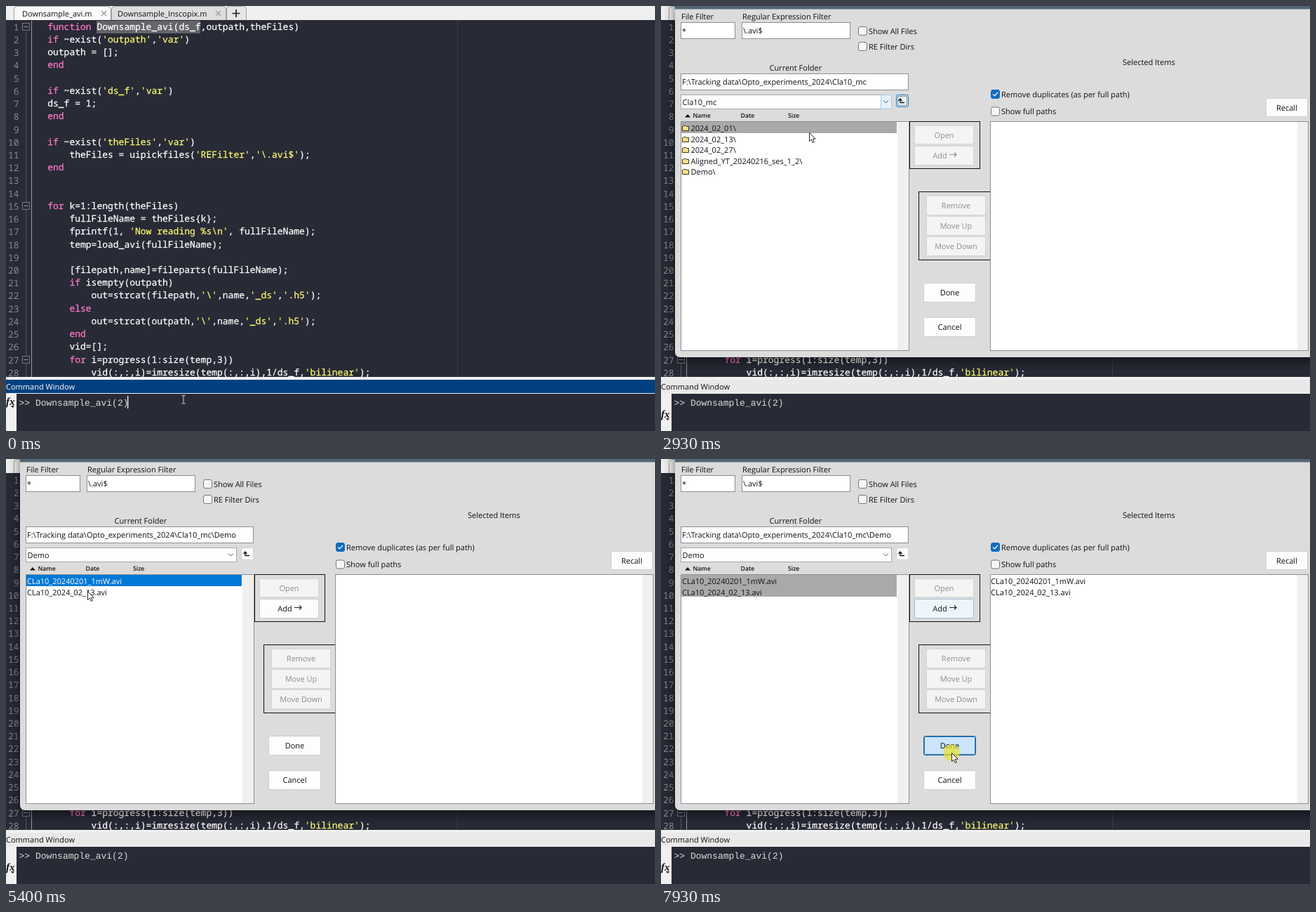
An HTML page that plays this animation: 925 by 605 pixels, repeating every 8 s.

```html
<!DOCTYPE html>
<html lang="en">
<head>
<meta charset="utf-8">
<title>Downsampling a video</title>
<style>
html, body { margin: 0; width: 100%; height: 100%; overflow: hidden; background: #282a36; }
svg { display: block; width: 925px; height: 605px; }
text { font: 11px "Open Sans", "Noto Sans", sans-serif; fill: #111; white-space: pre; text-rendering: geometricPrecision; }
.code { font: 13px "Noto Sans Mono", "DejaVu Sans Mono", monospace; fill: #fff; stroke: #fff; stroke-width: .25px; }
.num { fill: #878a92; stroke: none; text-anchor: end; }
.key { fill: #ff79c6; stroke: #ff79c6; }
.str { fill: #fbfb72; stroke: #fbfb72; }
.cmd { font: 13px "Liberation Mono", monospace; fill: #dcdcd8; }
.fx { font: italic bold 15px "Liberation Serif", serif; }
.mid { text-anchor: middle; }
.off { fill: #88918a; }
.white { fill: #fff; }
.small { font-size: 8.7px; font-weight: 600; }
.window { filter: drop-shadow(0 5px 9px rgba(0, 0, 0, .6)); }
</style>
</head>
<body>
<svg id="stage" viewBox="0 0 925 605"></svg>
<script>
const LOOP = 8000;
const T = {
  caretOff: 1380, enter: 1910, arrow: 2770, dialog: 2930,
  pickFolder: 3770, openFolder: 4180, pickFirst: 4920, pickSecond: 5470,
  hoverAdd: 6220, pressAdd: 6490, added: 6630, leaveAdd: 7390,
  hoverDone: 7310, pressDone: 7860
};

const source = String.raw`function Downsample_avi(ds_f,outpath,theFiles)
if ~exist('outpath','var')
outpath = [];
end

if ~exist('ds_f','var')
ds_f = 1;
end

if ~exist('theFiles','var')
    theFiles = uipickfiles('REFilter','\.avi$');
end


for k=1:length(theFiles)
    fullFileName = theFiles{k};
    fprintf(1, 'Now reading %s\n', fullFileName);
    temp=load_avi(fullFileName);

    [filepath,name]=fileparts(fullFileName);
    if isempty(outpath)
        out=strcat(filepath,'\',name,'_ds','.h5');
    else
        out=strcat(outpath,'\',name,'_ds','.h5');
    end
    vid=[];
    for i=progress(1:size(temp,3))
        vid(:,:,i)=imresize(temp(:,:,i),1/ds_f,'bilinear');`.split('\n');

const rect = (x, y, w, h, fill, stroke = 'none', rx = 0) =>
  `<rect x="${x}" y="${y}" width="${w}" height="${h}" fill="${fill}" stroke="${stroke}" rx="${rx}"/>`;
const box = (x, y, w, h, fill = '#fff', stroke = '#8c8f94', rx = 0) =>
  rect(x + .5, y + .5, w - 1, h - 1, fill, stroke, rx);
const line = (d, stroke, width = 1) =>
  `<path d="${d}" fill="none" stroke="${stroke}" stroke-width="${width}"/>`;
const text = (x, y, s, cls = '') => `<text x="${x}" y="${y}" class="${cls}">${s}</text>`;
const during = (from, to, ...parts) => `<g data-from="${from}" data-to="${to}">${parts.join('')}</g>`;

const highlight = s => s.replace(/'[^']*'|\b(?:function|if|else|end|for)\b/g,
  m => `<tspan class="${m[0] === "'" ? 'str' : 'key'}">${m}</tspan>`);

function fold(y) {
  return box(23, y - 5, 11, 11, '#282a36', '#74767e') + line(`M25.5 ${y + .5}h6`, '#9a9ca2');
}

function editor() {
  const pitch = 18.22;
  const rows = source.map((s, i) => {
    const y = Math.round(33.8 + i * pitch);
    return text(18.5, y + 1, i + 1, 'code num') + text(59.2, y, highlight(s), 'code');
  });
  return [
    rect(0, 20, 925, 508, '#282a36'),
    rect(643, 21, 1, 507, '#3b3d49'),
    rect(28, 36, 1, 492, '#555861'),
    rect(36, 21, 1, 507, '#9a9ca2'),
    rect(129, 21, 148, 18, '#636569'),
    ...rows, fold(29), fold(284), fold(503)
  ].join('');
}

function tabs() {
  const tab = (x, w, fill) =>
    `<path d="M${x}.5 20V5q0-4 4-4.500h${w - 8}q4 .5 4 4.500v15" fill="${fill}" stroke="#a0a0a0"/>`;
  const close = x => line(`M${x} 7l7 7m0-7l-7 7`, '#a4a4a4', 1.6);
  return [
    rect(0, 0, 925, 20, '#f0f0f0'),
    tab(150, 163, '#dedede'), tab(314, 28, '#e6e6e6'), tab(11, 138, '#fafafa'),
    text(23, 14.5, 'Downsample_avi.m'), close(136),
    text(159, 14.5, 'Downsample_Inscopix.m'), close(299),
    line('M322.500 10.5h11m-5.500-5.500v11', '#222', 1.7)
  ].join('');
}

function commandWindow() {
  const fx = y => text(0, y, 'fx', 'fx') + `<path d="M7 ${y + 1}h5l-2.500 3z" fill="#222"/>`;
  return [
    rect(0, 528, 925, 24, '#f0f0f0'),
    during(0, T.dialog, rect(0, 532, 925, 19, '#004080'), text(0, 546, 'Command Window', 'white')),
    during(T.dialog, LOOP, rect(0, 532, 925, 19, '#e9e9e9'), text(0, 546, 'Command Window')),
    rect(0, 552, 15, 53, '#f0f0f0'), rect(15, 552, 910, 53, '#282a36'),
    text(18.5, 569, '&gt;&gt; Downsample_avi(2)', 'cmd'),
    during(0, T.enter, fx(568)), during(T.enter, LOOP, fx(586)),
    during(0, T.caretOff, rect(173, 555, 1.3, 18, '#fff'))
  ].join('');
}

function button(x, y, w, h, label, state = '') {
  const [fill, edge] = {
    '': ['#fdfdfd', '#cfcfcf'], off: ['#f4f4f4', '#d5d5d5'],
    hover: ['#e2eff9', '#5c9fd0'], down: ['#cce4f7', '#1b5f99'], focus: ['#eef5fb', '#a9bccb']
  }[state];
  const arrow = label === 'Add';
  const ink = state === 'off' ? 'off' : '';
  return box(x, y, w, h, fill, edge, 2) +
    text(x + w / 2 - (arrow ? 6 : 0), y + h / 2 + 4, label, `mid ${ink}`) +
    (arrow ? line(`M${x + 50} ${y + 12.5}h10m-3-3l3 3-3 3`, ink ? '#88918a' : '#222', 1.1) : '');
}
const openButton = state => button(361, 170, 85, 27, 'Open', state);
const addButton = state => button(361, 199, 85, 28, 'Add', state);
const doneButton = state => button(374, 394, 75, 28, 'Done', state);

function checkbox(x, y, label, checked) {
  return box(x, y, 13, 13, checked ? '#0f6cbd' : '#f6f6f6', checked ? '#0f6cbd' : '#777', 2.5) +
    (checked ? line(`M${x + 3} ${y + 6.5}l2.500 2.500 4.500-5`, '#fff', 1.2) : '') +
    text(x + 15, y + 10.500, label);
}

const BLUE = '#0078d7', GREY = '#a9a9a9';
const rowY = i => Math.round(165 + 15.5 * i);

// picked maps a row index to its selection colour
function fileRows(names, picked = {}, x = 30) {
  return names.map((name, i) => {
    const y = rowY(i), folder = name.endsWith('\\');
    return (picked[i] ? rect(29, y, 307, rowY(i + 1) - y, picked[i]) : '') +
      (folder ? `<path d="M30.500 ${y + 6.5}h1l1-1h3l1 1h3v6h-9z" fill="#ffe08a" stroke="#3a3010"/>` : '') +
      text(folder ? 42.5 : x, y + 12.5, name, picked[i] === BLUE ? 'white' : '');
  }).join('');
}

function dialog() {
  const folders = ['2024_02_01\\', '2024_02_13\\', '2024_02_27\\', 'Aligned_YT_20240216_ses_1_2\\', 'Demo\\'];
  const files = ['CLa10_20240201_1mW.avi', 'CLa10_2024_02_13.avi'];
  const path = String.raw`F:\Tracking data\Opto_experiments_2024\Cla10_mc`;
  const upArrow = line('M347 137.500h-6v-5m-2.500 2.500l2.500-3 2.500 3', '#111', 1.3);
  const chevron = line('M317 134.500l3.500 3.500 3.500-3.500', '#555');
  return [
    `<rect class="window" x="20" y="-30" width="950" height="530" rx="7" fill="#dcdcdc"/>`,
    rect(20, 0, 905, 4.5, '#526674'),
    text(29, 18.5, 'File Filter'), text(116, 18.5, 'Regular Expression Filter'),
    box(28, 23, 78, 24), text(30, 40, '*'),
    box(115, 23, 155, 24), text(117, 39, String.raw`\.avi$`),
    checkbox(281, 29, 'Show All Files'), checkbox(281, 51, 'RE Filter Dirs'),
    text(154.5, 92, 'Current Folder'), text(658, 84, 'Selected Items'),
    checkbox(470, 119, 'Remove duplicates (as per full path)', true),
    checkbox(470, 143.500, 'Show full paths'),
    button(862, 131, 60, 27, 'Recall'),
    box(28, 96, 325, 24), box(28, 126, 301, 21, '#fff', '#a6a8ab'),
    during(0, T.openFolder, text(30, 112, path), text(30.5, 140.5, 'Cla10_mc')),
    during(T.openFolder, LOOP, text(30, 112, path + '\\Demo'), text(30.5, 140.5, 'Demo')),
    during(0, T.pickFolder, box(313, 126, 16, 21, '#e5f1fb', '#a5c9e5'),
      box(335, 126, 18, 18, '#e8f3fb', '#2474b5', 2), box(337, 128, 14, 14, 'none', '#7a8c9a')),
    during(T.pickFolder, LOOP, box(335, 126, 18, 18, '#fcfcfc', '#d0d0d0', 2)),
    upArrow, chevron,
    '<path d="M34 158.500h8l-4-4.500z" fill="#111"/>',
    text(45.5, 159, 'Name', 'small'), text(113.5, 159, 'Date', 'small'), text(181, 159, 'Size', 'small'),
    box(354, 164, 101, 68, 'none', '#111'), box(367, 264, 110, 98, 'none', '#111'),
    box(28, 164, 326, 327), rect(337, 165, 16, 325, '#f0f0f0'),
    box(469, 164, 454, 327), rect(907, 165, 15, 325, '#f0f0f0'),

    during(0, T.pickFolder, fileRows(folders, { 0: GREY })),
    during(T.pickFolder, T.openFolder, fileRows(folders, { 4: BLUE })),
    during(T.openFolder, T.pickFirst, fileRows(files, { 0: GREY })),
    during(T.pickFirst, T.pickSecond, fileRows(files, { 0: BLUE })),
    during(T.pickSecond, T.pressAdd, fileRows(files, { 0: BLUE, 1: BLUE }),
      line('M30 180.5H336', '#5aa4de')),
    during(T.pressAdd, LOOP, fileRows(files, { 0: GREY, 1: GREY })),
    during(T.added, LOOP, fileRows(files, {}, 470)),

    openButton('off'), during(T.pickFolder, T.openFolder, openButton('')),
    addButton('off'),
    during(T.pickFolder, T.openFolder, addButton('')),
    during(T.pickFirst, T.hoverAdd, addButton('')),
    during(T.hoverAdd, T.pressAdd, addButton('hover')),
    during(T.pressAdd, T.added, addButton('down')),
    during(T.added, T.leaveAdd, addButton('hover')),
    during(T.leaveAdd, LOOP, addButton('focus')),
    ...['Remove', 'Move Up', 'Move Down'].map((s, i) => button(378, 270 + 29 * i, 85, 28, s, 'off')),
    doneButton(''),
    during(T.hoverDone, T.pressDone, doneButton('hover')),
    during(T.pressDone, LOOP, doneButton('down'), box(375, 395, 73, 26, 'none', '#2f7fc0', 1)),
    button(374, 443, 75, 28, 'Cancel')
  ].join('');
}

const click = (from, to) => during(from, to,
  '<circle r="11.500" fill="#e9e22c" fill-opacity=".72"/>');

function pointer() {
  return '<g id="pointer">' + [
    click(1050, 1180), click(T.pickFolder, 4320), click(T.pickFirst, 5120),
    click(T.pickSecond, 5610), click(T.pressAdd, 6700), click(T.pressDone, LOOP),
    during(0, T.arrow, line('M-2.500-5.500h2l.5.5.5-.5h2M0-5V5.500M-2.500 6h2l.5-.5.5.5h2', '#d4d4d4')),
    during(3910, 4250, '<circle r="5.500" fill="none" stroke="#a3b94d" stroke-width="2"/>',
      '<path d="M0-5.500a5.500 5.500 0 0 1 5.500 5.500" fill="none" stroke="#6f9c62" stroke-width="2"/>'),
    ...[[T.arrow, 3910], [4250, LOOP]].map(([a, b]) => during(a, b,
      '<path d="M.5.500V12.500L3.300 10 5.300 14.500 7.300 13.600 5.300 9.200H9.200Z" fill="#fff" stroke="#111" stroke-width=".9"/>'))
  ].join('') + '</g>';
}

// time, x, y; equal positions hold the pointer still
const route = [
  [0, 253, 560], [240, 253, 560], [850, 178, 564], [2769, 178, 564],
  [2770, 178, 563], [2929, 178, 563], [2930, 211, 180], [3000, 205, 184],
  [3700, 73, 233], [4520, 73, 233], [4660, 101, 168], [4850, 101, 168],
  [4920, 101, 170], [5200, 101, 170], [5400, 116, 188], [5470, 118, 190],
  [5610, 118, 190], [5680, 150, 206], [6080, 437, 222], [6150, 490, 222],
  [6420, 422, 214], [6700, 422, 214], [7310, 419, 411], [7460, 418, 425],
  [7790, 414, 418], [8000, 414, 418]
];

function position(t) {
  const i = Math.max(1, route.findIndex(p => p[0] > t));
  const [t0, x0, y0] = route[i - 1], [t1, x1, y1] = route[i];
  const u = (t - t0) / (t1 - t0);
  const k = t1 - t0 > 450 ? u * u * (3 - 2 * u) : u;
  return [x0 + (x1 - x0) * k, y0 + (y1 - y0) * k];
}

const stage = document.getElementById('stage');
stage.innerHTML = editor() + tabs() + commandWindow() + during(T.dialog, LOOP, dialog()) + pointer();
const hand = document.getElementById('pointer');
const timed = [...stage.querySelectorAll('[data-from]')].map(node =>
  ({ node, from: +node.dataset.from, to: +node.dataset.to }));

function draw(t) {
  for (const { node, from, to } of timed) {
    node.style.display = t >= from && t < to ? '' : 'none';
  }
  hand.setAttribute('transform', `translate(${position(t).map(Math.round)})`);
}

const start = performance.now();
function tick() {
  draw((performance.now() - start) % LOOP);
  requestAnimationFrame(tick);
}
tick();
</script>
</body>
</html>
```
